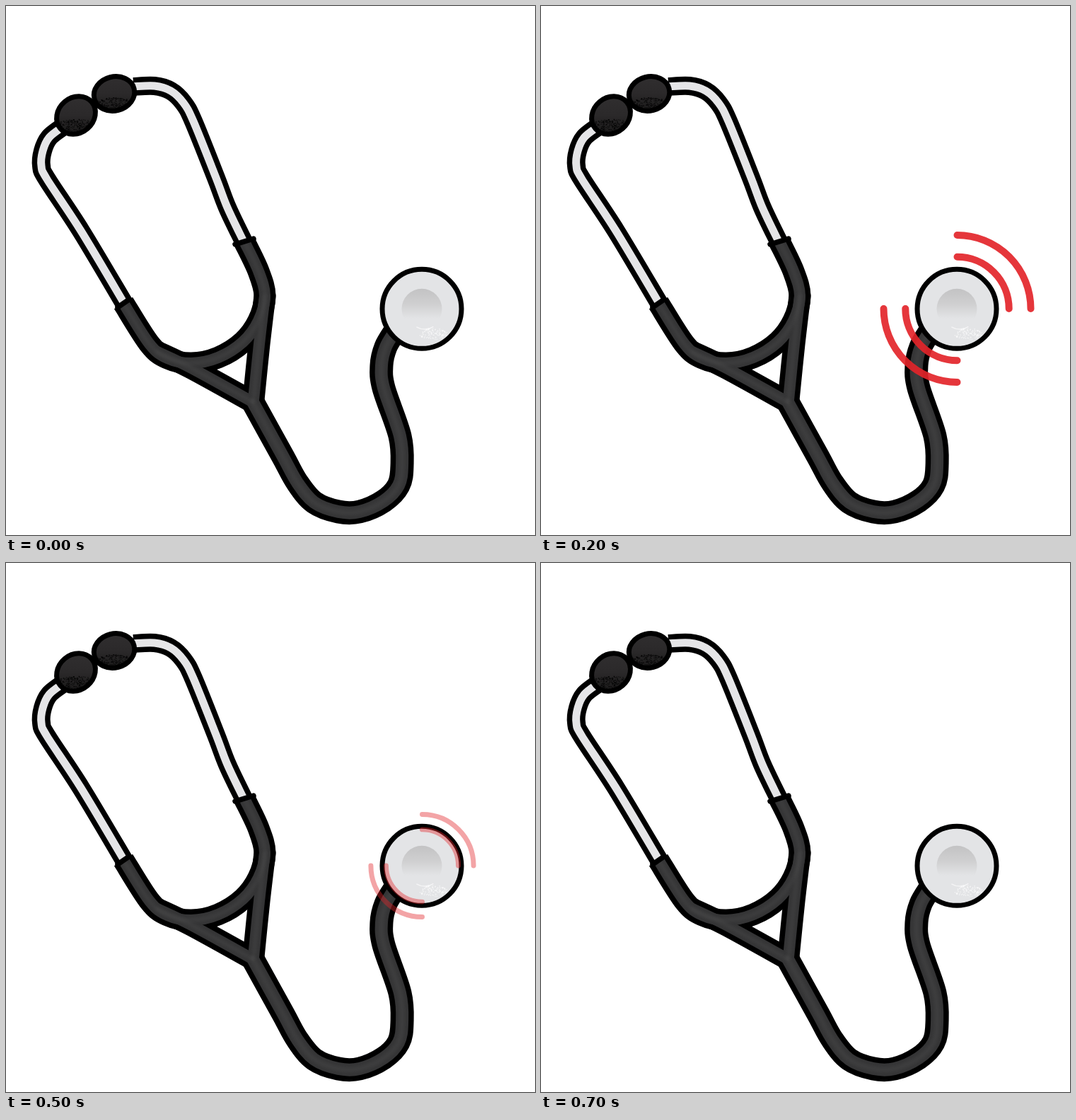
An HTML page with a canvas for the animation above (0.8 s loop, 748x748 px).

```html
<!DOCTYPE html>
<html lang="en">
<head>
<meta charset="utf-8">
<title>Stethoscope</title>
<style>
html, body { margin: 0; width: 100%; height: 100%; overflow: hidden; background: #fff; }
canvas { display: block; width: 748px; height: 748px; }
</style>
</head>
<body>
<canvas id="stage" width="748" height="748"></canvas>
<script>
const SIZE = 748, LOOP = 800, STEP = 100, TAU = Math.PI * 2, INK = 7.5;
const ctx = document.getElementById('stage').getContext('2d');
const art = document.createElement('canvas');
art.width = art.height = SIZE;
const g = art.getContext('2d');

// Smooth centre line through a few key points.
function curve(...pts) {
  const path = new Path2D(), at = i => pts[Math.max(0, Math.min(pts.length - 1, i))];
  path.moveTo(...pts[0]);
  for (let i = 0; i < pts.length - 1; i++) {
    const a = at(i - 1), b = at(i), c = at(i + 1), d = at(i + 2);
    path.bezierCurveTo(b[0] + (c[0] - a[0]) / 6, b[1] + (c[1] - a[1]) / 6,
      c[0] - (d[0] - b[0]) / 6, c[1] - (d[1] - b[1]) / 6, c[0], c[1]);
  }
  return path;
}

function stroke(path, color, width, cap = 'butt') {
  g.strokeStyle = color;
  g.lineWidth = width;
  g.lineCap = cap;
  g.stroke(path);
}

function circle(x, y, r, from = 0, to = TAU) {
  const path = new Path2D();
  path.arc(x, y, r, from, to);
  return path;
}

function fade(y0, y1, ...colors) {
  const grad = g.createLinearGradient(0, y0, 0, y1);
  colors.forEach((c, i) => grad.addColorStop(i / (colors.length - 1), c));
  return grad;
}

let seed = 7;
const rand = () => (seed = (seed * 16807) % 2147483647) / 2147483647;

function speckle(x, y, rx, ry, count, color) {
  g.fillStyle = color;
  for (let i = 0; i < count; i++) {
    const a = rand() * TAU, r = Math.sqrt(rand());
    g.fillRect(x + Math.cos(a) * r * rx, y + Math.sin(a) * r * ry, 1.4, 1.4);
  }
}

function drawMetal() {
  const right = curve([180, 114], [210, 113], [233, 120], [251, 137], [265, 163], [297, 243], [313, 285], [336, 333]);
  const left = curve([80, 171], [61, 186], [52, 205], [50, 226], [58, 245], [106, 318], [168, 422]);
  for (const tube of [right, left]) {
    stroke(tube, '#000', 26);
    stroke(tube, '#e5e5e7', 26 - 2 * INK);
  }
}

function drawRubber() {
  const yoke = curve([166, 420], [203, 478], [228, 498], [262, 505], [300, 497], [335, 475],
    [357, 445], [366, 410], [357, 375], [337, 333]);
  const struts = [
    curve([366, 410], [358, 478], [350, 557]),
    curve([214, 489], [262, 512], [349, 560])
  ];
  const hose = curve([349, 560], [391, 636], [412, 674], [436, 702], [470, 715], [500, 715], [534, 700],
    [555, 678], [560, 650], [557, 608], [534, 540], [531, 508], [537, 482], [550, 460]);
  const layer = (color, shrink) => {
    stroke(yoke, color, 31 - shrink);
    for (const s of struts) stroke(s, color, 31 - shrink, 'round');
    stroke(hose, color, 33 - shrink, 'round');
  };
  layer('#000', 0);
  layer('#353536', 2 * INK);
  g.filter = 'blur(2px)';
  layer('rgba(90,90,93,.22)', 25);
  g.filter = 'none';
  stroke(curve([324, 337], [350, 329]), '#000', INK, 'round');
  stroke(curve([158, 426], [174, 415]), '#000', INK, 'round');
}

function drawBud(x, y, rx, ry, tilt) {
  const bud = new Path2D();
  bud.ellipse(x, y, rx, ry, tilt, 0, TAU);
  g.fillStyle = fade(y - ry, y + ry, '#302e2f', '#2b292a', '#1b1a1a');
  g.fill(bud);
  g.save();
  g.clip(bud);
  speckle(x, y + ry * .6, rx, ry * .4, 220, 'rgba(0,0,0,.6)');
  g.restore();
  stroke(bud, '#000', 7);
}

function drawHead() {
  const x = 588, y = 428.3, rim = circle(x, y, 56);
  g.fillStyle = '#e3e4e6';
  g.fill(rim);
  g.fillStyle = fade(400, 442, '#c3c3c4', '#cfcfd0', '#e3e4e6');
  g.fill(circle(x, y, 28.5));
  stroke(circle(592, 434, 23, 1, 2.1), '#f4f4f5', 1.5);
  speckle(604, 463, 20, 8, 110, 'rgba(255,255,255,.55)');
  stroke(rim, '#000', 7);
}

function drawArt() {
  g.fillStyle = '#fff';
  g.fillRect(0, 0, SIZE, SIZE);
  g.lineJoin = 'round';
  drawMetal();
  drawRubber();
  drawBud(99, 154.5, 29, 25, -.7);
  drawBud(153, 124, 29, 24, -.25);
  drawHead();
}

// Two pairs of quarter arcs shrink and fade over steps 1 to 6.
function drawPulse(step) {
  const u = step - 1;
  const radius = 110 - 6 * u ** 1.32;
  const alpha = 1 - .8 * (u / 5) ** 1.4;
  ctx.strokeStyle = `rgba(227,36,42,${alpha})`;
  ctx.lineWidth = radius * .096;
  ctx.lineCap = 'round';
  for (const r of [radius, radius * .704]) {
    for (const start of [-TAU / 4, TAU / 4]) {
      ctx.beginPath();
      ctx.arc(588.5, 428, r, start, start + TAU / 4);
      ctx.stroke();
    }
  }
}

function frame() {
  const step = Math.floor(performance.now() % LOOP / STEP);
  ctx.drawImage(art, 0, 0);
  if (step >= 1 && step <= 6) drawPulse(step);
  requestAnimationFrame(frame);
}

drawArt();
frame();
</script>
</body>
</html>
```
